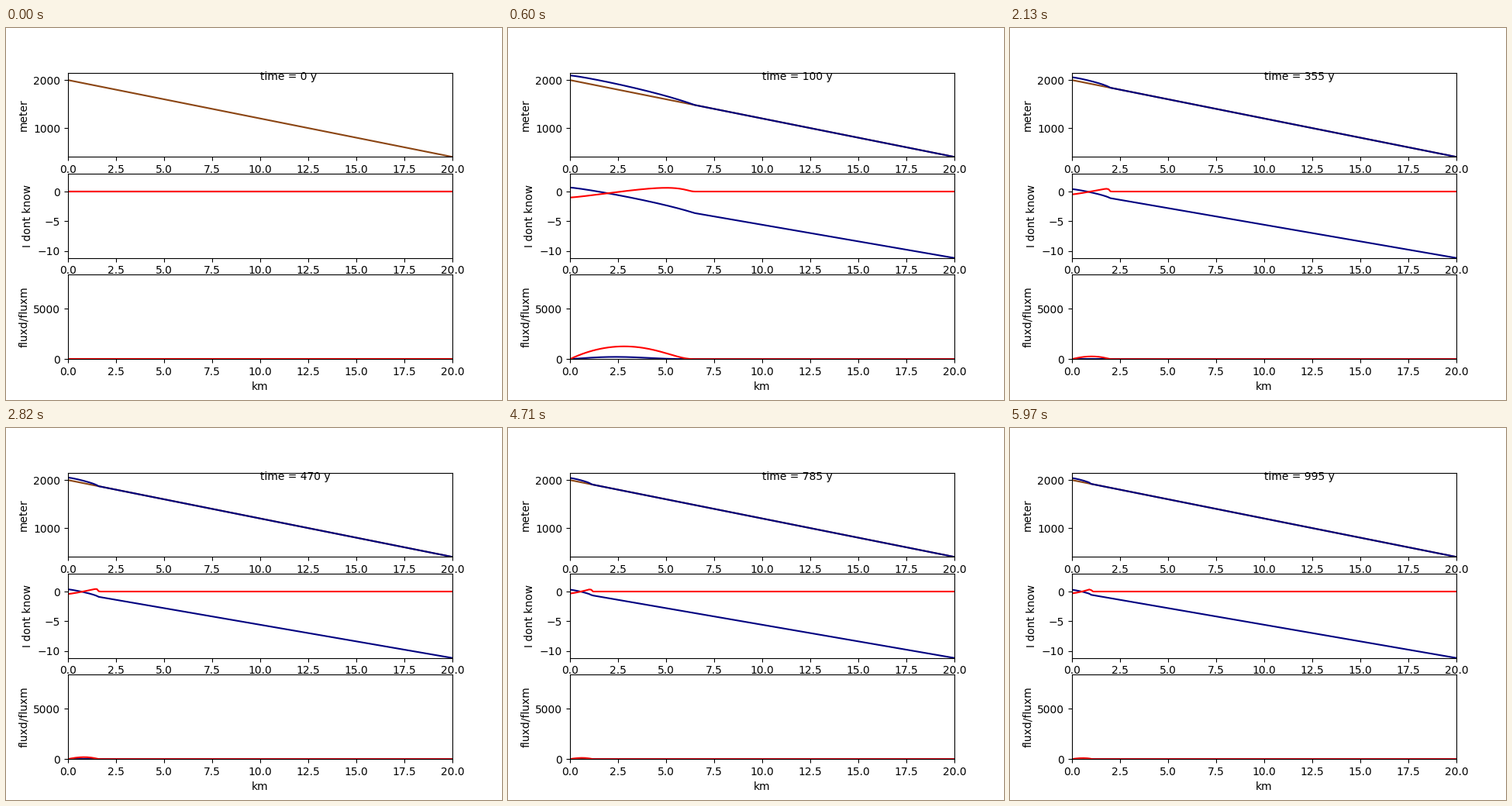
Animation, 640 px wide and 480 px high, one loop 6000 ms. Source, as a matplotlib script:

```python
import numpy as np
import matplotlib.pyplot as plt
from matplotlib.animation import FuncAnimation

FRAMES, STEP = 200, 5            # number of pictures, years between them
DX = 100.0                       # grid spacing in m
YEAR = 365 * 24 * 3600
RHO_G3 = (910 * 9.81) ** 3
DEFORM = 0.4 * 1.9e-24 * RHO_G3 * YEAR
SLIDE = 5.7e-20 * RHO_G3 * YEAR
BETA, ELA = 0.007, 2000          # balance gradient and equilibrium line
START_ICE = 230.0

x = np.arange(0, 20000 + DX, DX)
bed = 2000 - 0.08 * x


def fluxes(ice):
    """Deformation and sliding flux between nodes, and the largest diffusivity."""
    slope = -np.diff(bed + ice) / DX
    mid = (ice[1:] + ice[:-1]) / 2
    cube = slope ** 3
    deform = DEFORM * mid ** 5 * cube
    slide = SLIDE * mid ** 3 * cube
    spread = 3 * (DEFORM * mid ** 5 + SLIDE * mid ** 3) * slope ** 2
    return deform, slide, spread.max()


def inflow(q):
    """Ice gained per year at each node; free outflow at the lower end."""
    return -np.diff(np.concatenate(([0], q, q[-1:]))) / DX


def balance(ice):
    return BETA * (bed + ice - ELA)


def advance(ice, years):
    left = years
    while left > 1e-9:
        deform, slide, spread = fluxes(ice)
        dt = min(left, 0.25, 0.2 * DX ** 2 / (spread + 1e-9))
        ice = np.maximum(ice + dt * (balance(ice) + inflow(deform + slide)), 0)
        left -= dt
    return ice


def simulate():
    zero = np.zeros_like(x)
    states = [(zero * np.nan, zero, zero, zero, zero)]
    ice = np.full_like(x, START_ICE)
    for _ in range(FRAMES - 1):
        ice = advance(ice, STEP)
        deform, slide, _ = fluxes(ice)
        states.append((bed + ice, balance(ice), inflow(deform + slide),
                       np.append(0, deform), np.append(0, slide)))
    return states


states = simulate()
km = x / 1000

fig, (top, middle, bottom) = plt.subplots(3, 1, figsize=(6.4, 4.8), dpi=100)
panels = [(top, "meter", (400, 2155)),
          (middle, "I dont know", (-11.2, 3)),
          (bottom, "fluxd/fluxm", (0, 8400))]
for ax, label, limits in panels:
    ax.set_xlim(0, 20)
    ax.set_ylim(*limits)
    ax.set_ylabel(label)
bottom.set_xlabel("km")

top.plot(km, bed, color="saddlebrown")
lines = [ax.plot([], [], color=color)[0]
         for ax, color in [(top, "navy"), (middle, "navy"), (middle, "red"),
                           (bottom, "navy"), (bottom, "red")]]
clock = top.text(10, 2000, "")


def update(i):
    for line, values in zip(lines, states[i]):
        line.set_data(km, values)
    clock.set_text(f"time = {i * STEP} y")
    return [*lines, clock]


anim = FuncAnimation(fig, update, frames=FRAMES, interval=30,
                     repeat=True, repeat_delay=0)
plt.show()
```
